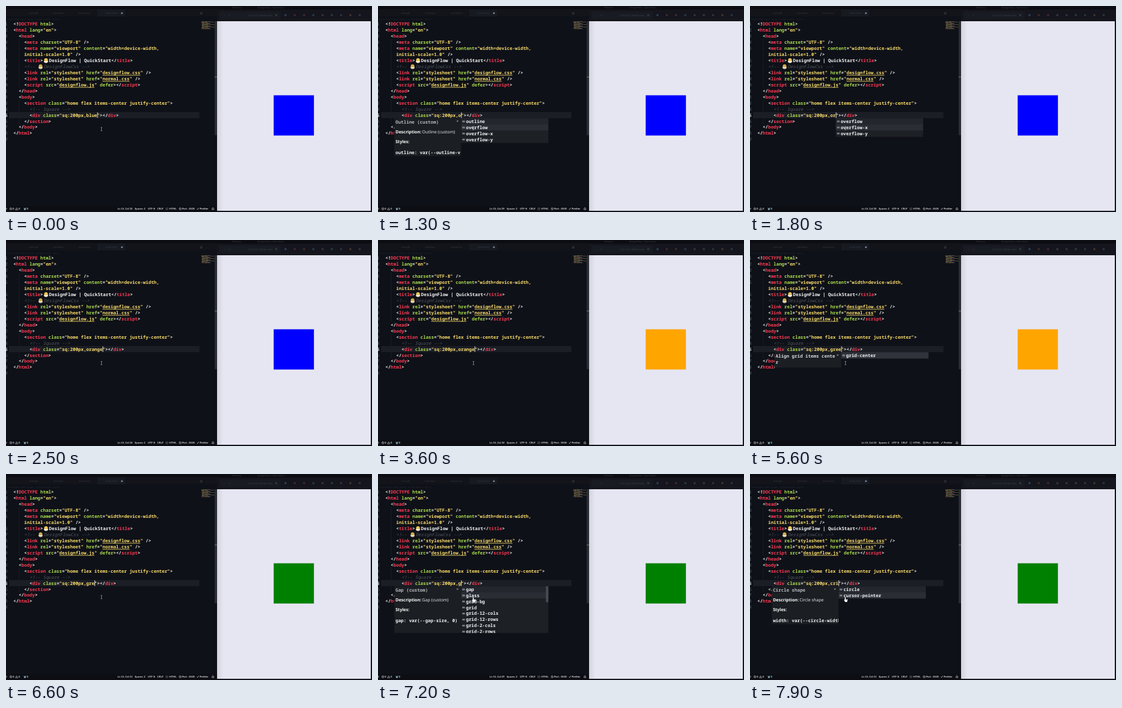
Recreate the animation shown at these times as an HTML page with a canvas. Size 600 by 338 pixels, loop 8000 ms.

```html
<!DOCTYPE html>
<html lang="en">
<head>
<meta charset="UTF-8">
<title>Live editing</title>
<style>
  html, body { margin: 0; width: 100%; height: 100%; overflow: hidden; background: #0f1118; }
  canvas { display: block; width: 600px; height: 338px; }
</style>
</head>
<body>
<canvas id="stage"></canvas>
<script>
const canvas = document.getElementById('stage');
const dpr = window.devicePixelRatio || 1;
canvas.width = 600 * dpr;
canvas.height = 338 * dpr;
const ctx = canvas.getContext('2d');
ctx.scale(dpr, dpr);
ctx.textRendering = 'geometricPrecision';

const LOOP = 8000, SIZE = 7.385, CW = SIZE * 0.6, X0 = 12, Y0 = 29.8, ROW = 9.95;
const MONO = '"Noto Sans Mono", "DejaVu Sans Mono", monospace';
const SANS = '"Open Sans", "Noto Sans", sans-serif';
const CODE = `600 ${SIZE}px ${MONO}`;
const SMALL = '4.2px Lato, "Open Sans", sans-serif';
const INK = {
  p: '#f2f3f5', w: '#f4f5f6', t: '#fb3a53', a: '#aada4c',
  s: '#f6da6a', u: '#f6da6a', c: '#50545c'
};

// Each piece starts with its colour key; "e" is the chick icon, "u" is underlined.
const open = (name, attrs = '') => `p<~t${name}${attrs}~p>`;
const close = name => `p</~t${name}~p>`;
const attr = (name, value) => `~a ${name}~p=~s"${value}"`;
const sheet = file => `p<~tlink${attr('rel', 'stylesheet')}~a href~p=~s"~u${file}~s"~p />`;
const divRow = value => `p<~tdiv${attr('class', value)}~p>~p</~tdiv~p>`;

// [line number, indent, pieces]
const lines = [
  [1, 0, 'p<!~tDOCTYPE~a html~p>'],
  [2, 0, open('html', attr('lang', 'en'))],
  [3, 2, open('head')],
  [4, 4, `p<~tmeta${attr('charset', 'UTF-8')}~p />`],
  [5, 4, `p<~tmeta${attr('name', 'viewport')}~a content~p=~s"width=device-width,`],
  ['', 4, 'sinitial-scale=1.0"~p />'],
  [6, 4, `${open('title')}~e~wDesignFlow | QuickStart~${close('title')}`],
  [7, 4, 'c<!-- ~e~cDesignFlowCss -->'],
  [8, 4, sheet('designflow.css')],
  [9, 4, sheet('normal.css')],
  [0, 4, `p<~tscript~a src~p=~s"~udesignflow.js~s"~a defer~p>~${close('script')}`],
  [1, 2, close('head')],
  [2, 2, open('body')],
  [3, 4, open('section', attr('class', 'home flex items-center justify-center'))],
  [4, 6, 'c<!-- Square -->'],
  [5, 6, ''],
  [6, 4, close('section')],
  [7, 2, close('body')],
  [8, 0, close('html')],
  [9, 0, '']
];

const card = (title, name, styles) => ({ title, name, styles });
const popups = {
  o: { list: 'outline overflow overflow-x overflow-y',
       doc: card('Outline (custom)', 'Outline (custom)', 'outline: var(--outline-v') },
  or: { list: 'overflow overflow-x overflow-y' },
  g: { list: 'gap glass grad-bg grid grid-12-cols grid-12-rows grid-2-cols grid-2-rows',
       doc: card('Gap (custom)', 'Gap (custom)', 'gap: var(--gap-size, 0)'), tall: 76.5 },
  gre: { list: 'grid-center', note: ['Align grid items cente', 'r'] },
  c: { list: 'circle cursor-pointer',
       doc: card('Circle shape', 'Circle shape', 'width: var(--circle-width)') }
};

// [start, text after "sq:200px", popup]
const typing = [
  [0, ',blue'], [200, ',blu'], [300, ',bl'], [400, ',b'], [600, ','], [800, ''],
  [1000, ','], [1200, ',o', 'o'], [1700, ',or', 'or'], [1900, ',ora'],
  [2300, ',oran'], [2400, ',orang'], [2500, ',orange'],
  [3700, ',orang'], [4200, ',ora'], [4300, ',o'], [4600, ','],
  [5200, ',g', 'g'], [5500, ',gre', 'gre'], [5600, ',gree', 'gre'], [5800, ',green'],
  [6400, ',gree'], [6600, ',gre'], [6700, ',gr'], [6800, ',g'], [6900, ',g', 'g'],
  [7400, ','], [7600, ',c', 'c'], [7800, ',cr', 'c'], [7900, ',cri', 'c']
];
const fills = [[0, '#0000ff'], [3100, '#ffa500'], [6100, '#008000']];
const caretOff = [[2700, 2900], [4000, 4200]];

const at = (steps, t) => steps.filter(s => s[0] <= t).pop();

function box(x, y, w, h, color) {
  ctx.fillStyle = color;
  ctx.fillRect(x, y, w, h);
}

function dot(x, y, r, color) {
  ctx.fillStyle = color;
  ctx.beginPath();
  ctx.arc(x, y, r, 0, 7);
  ctx.fill();
}

function text(str, x, y, font, color) {
  ctx.font = font;
  ctx.fillStyle = color;
  ctx.fillText(str, x, y);
}

function path(points, color, width = 0.7) {
  ctx.strokeStyle = color;
  ctx.lineWidth = width;
  ctx.beginPath();
  points.forEach(([x, y], i) => i ? ctx.lineTo(x, y) : ctx.moveTo(x, y));
  ctx.stroke();
}

function chick(x, y, dim) {
  ctx.globalAlpha = dim ? 0.85 : 1;
  dot(x + 4.8, y - 0.8, 3, '#f8d15a');
  ctx.fillStyle = '#f3e6cc';
  ctx.beginPath();
  ctx.arc(x + 4.8, y + 0.5, 3.5, 0, Math.PI);
  ctx.fill();
  dot(x + 3.8, y - 1.3, 0.4, '#5a4020');
  dot(x + 5.8, y - 1.3, 0.4, '#5a4020');
  dot(x + 4.8, y - 0.4, 0.5, '#e88a30');
  ctx.globalAlpha = 1;
}

function codeLine(pieces, x, y) {
  for (const piece of pieces.split('~')) {
    const key = piece[0], str = piece.slice(1);
    if (key === 'e') {
      chick(x, y, pieces[0] === 'c');
      x += 9.8;
      continue;
    }
    if (!key) continue;
    const w = str.length * CW;
    text(str, x, y + 2.5, key === 'c' ? `italic ${SIZE}px ${MONO}` : CODE, INK[key]);
    if (key === 'u') box(x, y + 4, w, 0.8, INK.u);
    x += w;
  }
}

function minimap() {
  const hues = ['#8a3540', '#70823f', '#94833f', '#666a70'];
  for (let i = 0; i < 13; i++) {
    let x = 320 + (i > 1 && i < 12 ? 1 : 0);
    const parts = 2 + (i * 5 + 2) % 4;
    for (let k = 0; k < parts; k++) {
      const w = 2 + (i * 3 + k * 5) % 4;
      box(x, 25.3 + i, w, 0.6, hues[(i + k) % 4]);
      x += w + 0.5;
    }
  }
}

function chrome() {
  box(0, 0, 600, 338, '#0f1118');
  box(0, 0, 346, 17, '#12141a');
  box(0, 0, 346, 5, '#0b0d12');
  box(150, 6, 45, 11, '#171a21');
  const dim = '#343740';
  [['main.gif', 38], ['functions', 77], ['normal.css', 119], ['index.html', 163]]
    .forEach(([s, x]) => text(s, x, 13.4, SMALL, dim));
  dot(190, 11.8, 1.5, '#7b8496');
  text('index.html › html › body › section.home › div.sq', 2, 22.6, SMALL, '#24272e');
  box(318, 10, 4, 4, '#262930');
  text('…', 328, 13, SMALL, dim);

  minimap();
  box(342, 25, 4, 187, '#2a2c33');
  box(342, 116, 4, 1, '#73767c');

  // preview window
  box(346, 0, 254, 338, '#15161d');
  box(346, 0, 254, 6, '#0c0d12');
  box(350, 9, 100, 12, '#191b22');
  text('Preview', 371, 3.5, SMALL, dim);
  text('DesignFlow | QuickStart', 412, 3.5, SMALL, dim);
  text('‹  ›  ⟳', 358, 17, SMALL, dim);
  text('127.0.0.1:5500/index', 397, 17, SMALL, '#3c3f48');
  ['#34373e', '#30405a', '#46282f', '#472a30', '#2d3a4c', '#37363f', '#2a4033', '#33363e', '#46362f', '#33363e']
    .forEach((c, i) => dot(443 + i * 15.2, 15, 1.8, c));
  const shade = ctx.createLinearGradient(346, 0, 356, 0);
  shade.addColorStop(0, '#d3d3de');
  shade.addColorStop(1, '#e6e6f2');
  box(346, 25, 252, 311, shade);
}

function status(col) {
  box(0, 328.5, 346, 9.5, '#0c0e14');
  const c = '#d6d8dd', y = 334.2;
  [[`Ln 15, Col ${col}`, 183], ['Spaces: 2', 211], ['UTF-8', 232.5], ['CRLF', 248],
   ['{ }  HTML', 262], ['Port : 5500', 288.5], ['Prettier', 317.5], ['0', 11], ['0', 20.5], ['0', 34]]
    .forEach(([s, x]) => text(s, x, y, 'bold ' + SMALL, c));
  path([[0, 331], [1.5, 332.5], [0, 334]], c);
  ctx.strokeStyle = c;
  ctx.lineWidth = 0.6;
  for (const x of [8, 285.5]) {
    ctx.beginPath();
    ctx.arc(x, 332.7, 1.7, 0, 7);
    ctx.stroke();
    path([[x - 1, 331.7], [x + 1, 333.7]], c, 0.6);
  }
  path([[15.5, 334.4], [17.4, 331], [19.3, 334.4], [15.5, 334.4]], c, 0.6);
  dot(31, 333.4, 1.4, '#8fc0cf');
  dot(29.7, 331.6, 0.7, '#8fc0cf');
  dot(32.3, 331.6, 0.7, '#8fc0cf');
  path([[313, 332.8], [314.2, 334], [316, 331]], c);
  path([[337.6, 334], [338.2, 331.5], [339.2, 330.7], [340.2, 331.5], [340.8, 334], [337.6, 334]], c);
}

function popup({ list, doc, note, tall }, x) {
  const items = list.split(' '), top = 184.3, row = 9.9;
  const h = tall || items.length * row + 0.8;
  if (doc || note) {
    const left = x - 109.5, inset = left + 2;
    const docH = note ? 25 : 62;
    box(left, top, 109.5, tall || docH, '#1b1e22');
    ctx.save();
    ctx.beginPath();
    ctx.rect(left, top, 109, docH);
    ctx.clip();
    if (note) {
      note.forEach((s, i) => text(s, inset, 193 + i * 10, CODE, '#d4d7dc'));
    } else {
      text(doc.title, inset, 193, CODE, '#b4b8be');
      text('Description:', inset, 208.5, `bold 7px ${SANS}`, '#ffffff');
      text(doc.name, inset + 43.5, 208.5, `500 7px ${SANS}`, '#f0f2f4');
      text('Styles:', inset, 225.4, `bold 7px ${SANS}`, '#ffffff');
      text(doc.styles, inset, 243, CODE, '#f0f2f4');
    }
    ctx.restore();
    path([[x - 7, 187.7], [x - 4.8, 189.9]], '#d4d7dc');
    path([[x - 4.8, 187.7], [x - 7, 189.9]], '#d4d7dc');
  }
  box(x, top, 143, h, '#1d2025');
  box(x, top, 143, row, items.length === 1 ? '#30333b' : '#23262d');
  if (items.length > 1) box(x, top + row, 143, row, '#2a2d34');
  ctx.save();
  ctx.beginPath();
  ctx.rect(x, top, 143, h);
  ctx.clip();
  items.forEach((s, i) => {
    const y = 189.3 + i * row;
    box(x + 2, y - 1.1, 4, 2.5, '#989fa8');
    box(x + 2.7, y, 2.6, 0.6, '#2a2d34');
    text(s, x + 8, y + 2.5, CODE, '#f0f2f4');
  });
  ctx.restore();
  if (tall) box(x + 139, top, 4, 26, '#484b51');
}

function hand(x, y) {
  box(x - 1.5, y - 4, 1.5, 5, '#fff');
  ctx.fillStyle = '#fff';
  ctx.beginPath();
  ctx.moveTo(x - 3, y);
  ctx.lineTo(x + 3, y - 1);
  ctx.lineTo(x + 2.2, y + 3.5);
  ctx.lineTo(x - 1, y + 3.5);
  ctx.fill();
}

function beam(x, y) {
  path([[x - 1.2, y - 2.7], [x + 1.2, y - 2.7]], '#c4c6ca', 0.6);
  path([[x, y - 2.7], [x, y + 2.7]], '#c4c6ca', 0.6);
  path([[x - 1.2, y + 2.7], [x + 1.2, y + 2.7]], '#c4c6ca', 0.6);
}

function draw(t) {
  const [, tail, menu] = at(typing, t);
  const value = 'sq:200px' + tail;
  const caret = X0 + 0.2 + (18 + value.length) * CW;
  chrome();
  box(438.8, 146.5, 66, 66, at(fills, t)[1]);
  box(5, 174, 312, 10, '#1c1e25');
  // indent guides inside head and body
  box(21, 54.5, 0.7, 79.5, '#1d2027');
  box(21, 154, 0.7, 40, '#1d2027');
  lines.forEach(([num, indent, pieces], i) => {
    const y = Y0 + i * ROW, active = i === 15;
    text(String(num), -1.7, y + 2.5, CODE, active ? '#d5d7da' : '#41454e');
    codeLine(active ? divRow(value) : pieces, X0 + indent * CW, y);
  });
  if (!caretOff.some(([a, b]) => t >= a && t < b)) box(caret, 174.5, 0.9, 9.2, '#f0f1f3');
  if (menu) popup(popups[menu], caret);
  status(19 + value.length);
  if (menu === 'g' || menu === 'c') hand(157, 206.5);
  else beam(156.5, menu && menu[0] === 'o' ? 200.5 : 202);
}

const start = performance.now();
function tick() {
  draw((performance.now() - start) % LOOP);
  requestAnimationFrame(tick);
}
tick();
</script>
</body>
</html>
```
